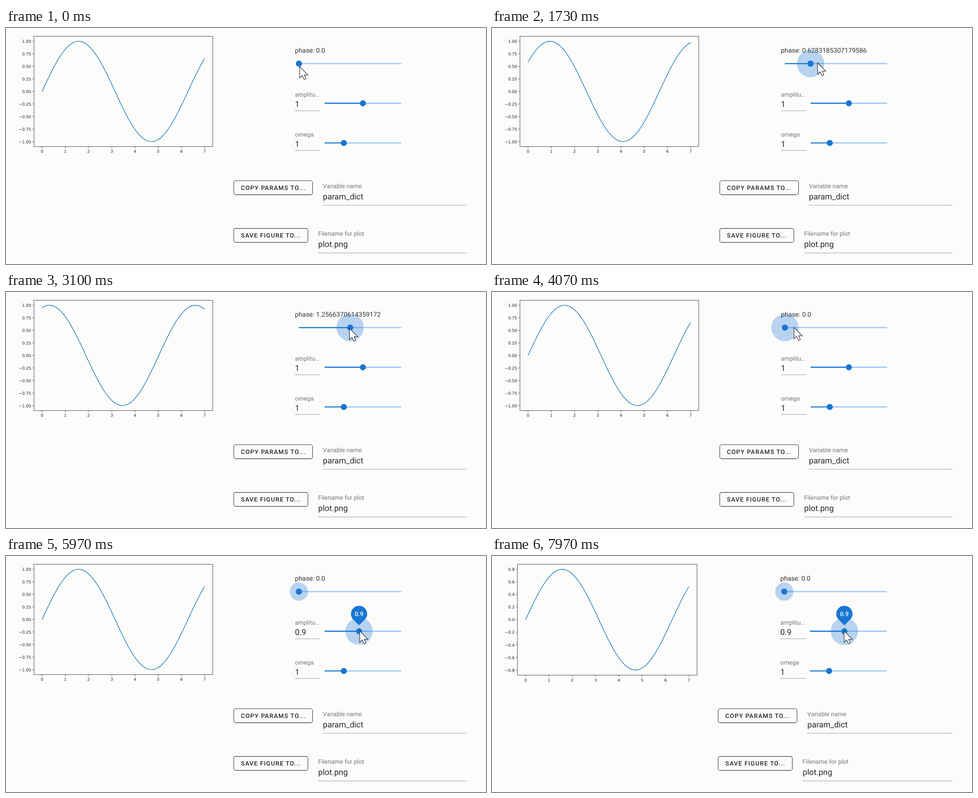
An HTML page that plays this animation: 1064x526 px, repeating every 8000 ms.

```html
<!DOCTYPE html>
<html lang="en">
<head>
<meta charset="utf-8">
<title>Sine plot controls</title>
<style>
html, body { margin: 0; width: 100%; height: 100%; overflow: hidden; background: #fcfcfb; }
svg { display: block; width: 1064px; height: 526px; font-family: Roboto, sans-serif; text-rendering: geometricPrecision; }
.plot { font: 9.1px "DejaVu Sans", sans-serif; fill: #222; }
.text { font-size: 14.63px; fill: #333; }
.label { font-size: 13.5px; fill: #757575; }
.value { font-size: 18px; fill: #272727; }
.button { font-size: 13.5px; font-weight: 500; letter-spacing: 1.206px; fill: #222; }
.tip { font-size: 13.5px; font-weight: 500; fill: #fff; text-anchor: middle; }
</style>
</head>
<body>
<svg id="stage" viewBox="0 0 1064 526"></svg>
<script>
const LOOP = 8000, LAG = 150, BLUE = '#1976d2';
const PHASE_DOWN = 700, PHASE_UP = 5050, AMP_DOWN = 5650;
const PHASE_STEP = 56.75, HALO = 30.3, FOCUS = 20.3;
const stage = document.getElementById('stage');

// Pointer path: time, x, y
const path = [
  [0, 651, 86], [600, 651, 85], [800, 653, 80], [1730, 721.5, 77.5],
  [2450, 806, 78], [2600, 806, 79], [3100, 761.5, 81], [3850, 672, 80],
  [4070, 669.5, 79], [4300, 665, 80], [5100, 665, 80], [5420, 810, 163],
  [5620, 790, 167], [5800, 790, 167], [5970, 784, 167], [7070, 743.5, 167],
  [7250, 738, 167], [7970, 780.5, 167], [8000, 782, 167]
];

function pointer(t) {
  const i = Math.max(1, path.findIndex(p => p[0] >= t));
  const a = path[i - 1], b = path[i], k = (t - a[0]) / (b[0] - a[0]);
  return [a[1] + (b[1] - a[1]) * k, a[2] + (b[2] - a[2]) * k];
}

const phaseIndex = t =>
  t > PHASE_DOWN && t < PHASE_UP ? Math.max(0, Math.round((pointer(t)[0] - 649) / PHASE_STEP)) : 0;
const amplitude = t =>
  t > AMP_DOWN ? Math.round((pointer(t)[0] - 706.5) / 8.5) / 10 : 1;

// Eased 0..1 over 250 ms from a start time
function ease(t, start) {
  const k = Math.min(1, Math.max(0, (t - start) / 250));
  return 1 - (1 - k) ** 3;
}

const text = (x, y, s, cls, more = '') => `<text x="${x}" y="${y}" class="${cls}" ${more}>${s}</text>`;
const line = (x1, y1, x2, y2, color, w) =>
  `<line x1="${x1}" y1="${y1}" x2="${x2}" y2="${y2}" stroke="${color}" stroke-width="${w}"/>`;
const underline = (x1, x2, y) => line(x1, y, x2, y, '#979797', 1);

function plot(amp, phase, step) {
  const wide = step === 0.25;
  const [left, right, top, bottom] = wide ? [62, 458.3, 18.4, 264.3] : [56.3, 454.5, 18.4, 265.5];
  const sx = (right - left) / 7.7, sy = (bottom - top) / (2.2 * amp), mid = (top + bottom) / 2;
  const px = x => left + (x + 0.35) * sx, py = y => mid - y * sy;
  let out = '';
  for (let i = 0; i <= 7; i++) {
    out += line(px(i), bottom, px(i), bottom + 3.3, '#333', 0.9) +
      text(px(i), bottom + 14, i, 'plot', 'text-anchor="middle"');
  }
  const n = Math.floor(1.1 * amp / step + 1e-6);
  for (let i = -n; i <= n; i++) {
    const y = py(i * step);
    const label = (i < 0 ? '\u2212' : '') + Math.abs(i * step).toFixed(wide ? 2 : 1);
    out += line(left - 3.3, y, left, y, '#333', 0.9) +
      text(left - 6.1, y + 3.4, label, 'plot', 'text-anchor="end"');
  }
  const points = [];
  for (let i = 0; i <= 140; i++) {
    const x = i / 20;
    points.push(px(x).toFixed(2) + ',' + py(amp * Math.sin(x + phase)).toFixed(2));
  }
  return out +
    `<polyline points="${points.join(' ')}" fill="none" stroke="#1f77b4" stroke-width="1.4"/>` +
    `<rect x="${left}" y="${top}" width="${right - left}" height="${bottom - top}" fill="none" stroke="#333" stroke-width=".9"/>`;
}

function slider(x1, x2, y, thumb, w, halo = 0) {
  return line(x1, y, x2, y, '#90c4f9', w) + line(x1, y, thumb, y, BLUE, w) +
    `<circle cx="${thumb}" cy="${y}" r="${halo}" fill="${BLUE}" opacity=".3"/>` +
    `<circle cx="${thumb}" cy="${y}" r="6.8" fill="${BLUE}"/>`;
}

function tooltip(x, scale, value) {
  return `<g transform="translate(${x} 154.5) scale(${scale})">
    <path transform="translate(0 -25.5) rotate(45)" d="M18 18H0A18 18 0 1 1 18 0Z" fill="${BLUE}"/>
    ${text(0, -20.7, value, 'tip')}</g>`;
}

function buttonRow(x, width, y, caption, fieldX, label, value) {
  return `<rect x="${x}" y="${y}" width="${width}" height="31.3" rx="4.5" fill="none" stroke="#333" stroke-width="1.1"/>` +
    text(x + 16, y + 20.6, caption, 'button') +
    text(fieldX, y + 16.8, label, 'label') +
    text(fieldX, y + 41.7, value, 'value') +
    underline(fieldX, 1021, y + 54.8);
}

function draw(t) {
  const amp = amplitude(t), k = phaseIndex(t);
  const past = Math.max(0, t - LAG), plotAmp = amplitude(past);
  const step = [0.1, 0.2, 0.25].find(s => s >= 2.2 * plotAmp / 9);
  const narrow = step < 0.25, dx = narrow ? -1.5 : 0, bx = narrow ? 501.3 : 504.8;
  const labelX = 640.5 + dx, x1 = 706.3 + dx, x2 = 876 + dx, phaseX = 649.3 + dx;
  const ampX = x1 + amp * 84.8;
  const phaseHalo = HALO * ease(t, PHASE_DOWN) - (HALO - FOCUS) * ease(t, PHASE_UP);
  const grow = ease(t, AMP_DOWN), [cx, cy] = pointer(t);
  const phase = k * Math.PI / 5;

  stage.innerHTML = plot(plotAmp, phaseIndex(past) * Math.PI / 5, step) +
    text(labelX, 55, 'phase: ' + (k ? k * 0.6283185307179586 : '0.0'), 'text') +
    slider(phaseX, x2, 79.4, phaseX + k * PHASE_STEP, 2.2, phaseHalo) +
    text(labelX, 153.3, 'amplitu\u2026', 'label') +
    text(labelX, 176.2, amp, 'value') + underline(labelX, labelX + 56.3, 184.5) +
    slider(x1, x2, 167.7, ampX, 2.6, HALO * grow) +
    tooltip(ampX, grow, amp) +
    text(labelX, 241.8, 'omega', 'label') +
    text(labelX, 264.5, 1, 'value') + underline(labelX, labelX + 56.3, 272.8) +
    slider(x1, x2, 256.2, x1 + 42.4, 2.2) +
    buttonRow(bx, 174.7, 340.3, 'COPY PARAMS TO...', bx + 197.8, 'Variable name', 'param_dict') +
    buttonRow(bx, 164.4, 446.6, 'SAVE FIGURE TO...', bx + 187.3, 'Filename for plot', 'plot.png') +
    `<path transform="translate(${cx} ${cy})" d="M0 0V25.3L5.6 20L10 29L14 27.3L10.2 18.6H18.2Z" fill="#fff" stroke="#2b2b33" stroke-width="1.2"/>`;
}

const start = performance.now();
function frame() {
  draw((performance.now() - start) % LOOP);
  requestAnimationFrame(frame);
}
frame();
</script>
</body>
</html>
```
